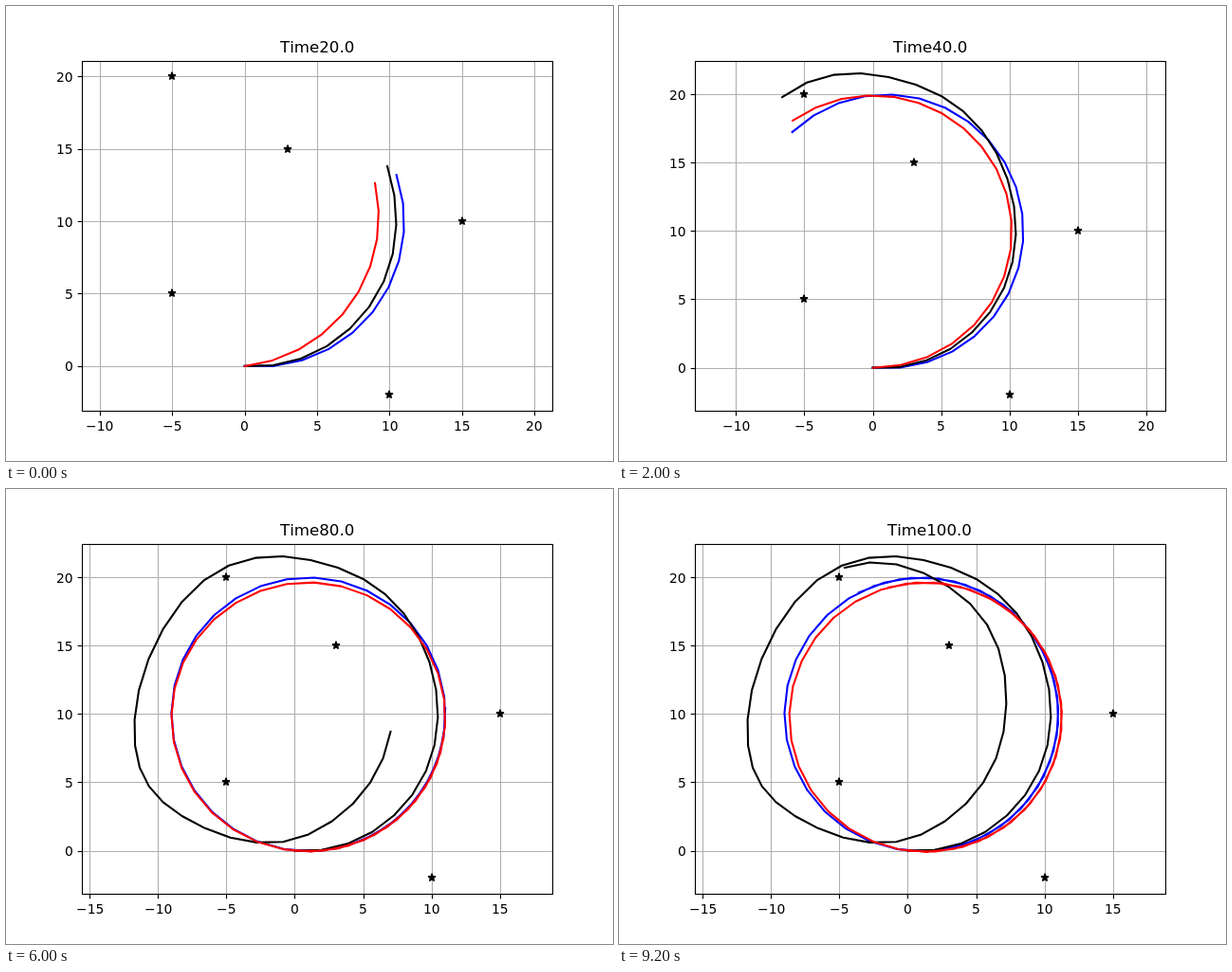
An HTML page with a canvas for the animation above (10 s loop, 640x480 px).

```html
<!DOCTYPE html>
<html lang="en">
<head>
<meta charset="utf-8">
<title>Path estimate</title>
<style>
  html, body { margin: 0; width: 640px; height: 480px; overflow: hidden; background: #fff; }
  canvas { display: block; }
</style>
</head>
<body>
<canvas id="plot" width="640" height="480"></canvas>
<script>
const ctx = document.getElementById('plot').getContext('2d');
const FONT = '"DejaVu Sans", sans-serif';
const LEFT = 80.5, TOP = 58.5, RIGHT = 576.5, BOTTOM = 427.5;
const HOLD = 2000;

const landmarks = [[-5, 20], [3, 15], [15, 10], [-5, 5], [10, -2]];

// Each view: pixel origin, pixels per unit, range of x ticks
const near = { ox: 251.64, oy: 379.85, s: 15.273, from: -10, to: 20 };
const mid = { ox: 267.55, oy: 381.56, s: 14.42, from: -10, to: 20 };
const wide = { ox: 304.45, oy: 381.56, s: 14.42, from: -15, to: 15 };

// Each estimate runs round an ellipse; "lead" is how far it gets ahead midway
const scenes = [
  { view: near, center: [-1.155, 10.335], radius: [10.41, 10.41], angle: [.113, 1.793], lead: 0 },
  { view: mid, center: [.03, 9.956], radius: [10.146, 9.965], angle: [0, 3.76], lead: .07 },
  { view: wide, center: [1.25, 9.713], radius: [9.95, 9.744], angle: [-.12, 5.7], lead: .17 },
  { view: wide, center: [1, 9.782], radius: [10.014, 9.847], angle: [-.1, 7.7], lead: 0 },
  { view: wide, center: [1.307, 9.77], radius: [9.965, 9.86], angle: [-.13, 9.7], lead: 0 }
];

// Dead reckoning error at every fifth step
const drift = [[0, 0], [-.25, .35], [-.63, .6], [-.24, 1.01], [-.73, 2.56], [-2.87, 1.48],
  [-5.5, 1.86], [-5.79, -.61], [-4, -1.72], [-1.47, -.56], [-1.03, 1.83]];

const snap = v => Math.round(v) + .5;
const toPx = (v, [x, y]) => [v.ox + x * v.s, v.oy - y * v.s];

const onEllipse = ([cx, cy], [rx, ry], a) => [cx + rx * Math.sin(a), cy - ry * Math.cos(a)];

// Unit speed, two seconds per step, turning 0.1 rad/s
function truth(k) {
  const r = 1 / Math.sin(.1);
  return onEllipse([1, r * Math.cos(.1)], [r, r], .2 * k - .1);
}

function estimate({ center, radius, angle: [a, b], lead }, t) {
  return onEllipse(center, radius, a + (b - a) * t + lead * Math.sin(Math.PI * t) ** 2);
}

function spline(keys, t, axis) {
  const i = Math.floor(t), f = t - i;
  const [a, b, c, d] = [-1, 0, 1, 2].map(
    n => keys[Math.min(Math.max(i + n, 0), keys.length - 1)][axis]);
  return b + f / 2 * (c - a + f * (2 * a - 5 * b + 4 * c - d + f * (3 * (b - c) + d - a)));
}

const deadReckoning = k => truth(k).map((p, axis) => p + spline(drift, k / 5, axis));

function line(points, color, width = 1.11) {
  ctx.beginPath();
  points.forEach(p => ctx.lineTo(...p));
  ctx.strokeStyle = color;
  ctx.lineWidth = width;
  ctx.stroke();
}

function curve(view, count, point, color) {
  ctx.lineJoin = 'round';
  ctx.lineCap = 'square';
  line(Array.from({ length: count }, (_, k) => toPx(view, point(k))), color, 2.08);
}

// "anchor" is the share of the text's width left of x
function label(text, x, y, anchor, size = 13.89) {
  const shown = String(text).replace('-', '\u2212');
  ctx.font = `${size}px ${FONT}`;
  ctx.fontKerning = 'none';
  ctx.fillStyle = '#000';
  ctx.fillText(shown, Math.round(x - anchor * ctx.measureText(shown).width), y);
}

function star([px, py]) {
  const x = Math.round(px), y = Math.round(py);
  ctx.beginPath();
  for (let i = 0; i < 10; i++) {
    const r = i % 2 ? 1.59 : 4.17, a = i * Math.PI / 5;
    ctx.lineTo(x + r * Math.sin(a), y - r * Math.cos(a));
  }
  ctx.closePath();
  ctx.lineJoin = 'bevel';
  ctx.lineWidth = 1.39;
  ctx.strokeStyle = ctx.fillStyle = '#000';
  ctx.fill();
  ctx.stroke();
}

function axes(v) {
  ctx.lineCap = 'butt';
  for (let n = v.from; n <= v.to; n += 5) {
    const x = v.ox + n * v.s, gx = snap(x);
    line([[gx, TOP], [gx, BOTTOM]], '#b0b0b0');
    line([[gx, BOTTOM], [gx, BOTTOM + 4.86]], '#000');
    label(n, x, 448, .5);
  }
  for (let n = 0; n <= 20; n += 5) {
    const y = v.oy - n * v.s, gy = snap(y);
    line([[LEFT, gy], [RIGHT, gy]], '#b0b0b0');
    line([[LEFT, gy], [LEFT - 4.86, gy]], '#000');
    label(n, 70.5, Math.ceil(y + 5), 1);
  }
}

function border() {
  ctx.lineWidth = 1.11;
  ctx.lineJoin = 'miter';
  ctx.strokeStyle = '#000';
  ctx.strokeRect(LEFT, TOP, RIGHT - LEFT, BOTTOM - TOP);
}

function draw(index) {
  const scene = scenes[index], v = scene.view, steps = 10 * (index + 1);
  ctx.fillStyle = '#fff';
  ctx.fillRect(0, 0, 640, 480);
  axes(v);
  landmarks.forEach(p => star(toPx(v, p)));
  curve(v, steps + 1, truth, '#00f');
  curve(v, steps + 1, deadReckoning, '#000');
  curve(v, steps, k => estimate(scene, k / (steps - 1)), '#f00');
  border();
  label(`Time${2 * steps}.0`, 327.9, 49, .5, 16.67);
}

const start = performance.now();
function tick() {
  draw(Math.floor((performance.now() - start) / HOLD) % scenes.length);
  requestAnimationFrame(tick);
}
tick();
</script>
</body>
</html>
```
